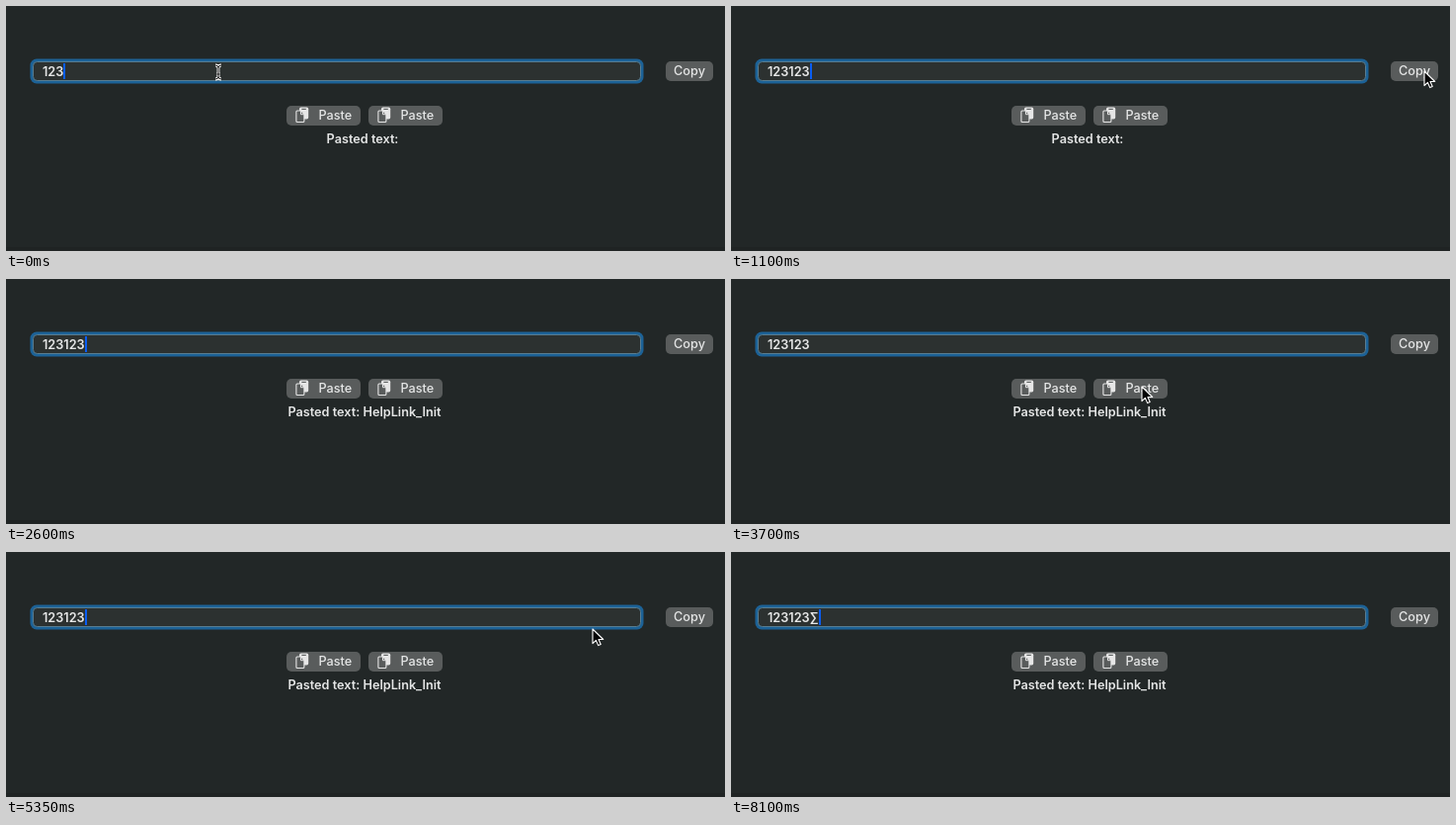
These frames come from a looping animation (728 by 248 pixels, 8650 ms). An HTML page:

```html
<!DOCTYPE html>
<html lang="en">
<head>
<meta charset="utf-8">
<title>Paste buttons</title>
<style>
  html, body { margin: 0; width: 100%; height: 100%; overflow: hidden; background: #222727; }
  svg { display: block; width: 728px; height: 248px; }
  text { font: 500 12.7px Inter, "Liberation Sans", sans-serif; fill: #e5e6e6; white-space: pre; }
  #typed, #pasted { font-weight: 600; }
  .button { fill: #595c5c; }
  .button.pressed { fill: #777a7a; }
</style>
</head>
<body>
<svg viewBox="0 0 728 248" xmlns="http://www.w3.org/2000/svg">
  <defs>
    <g id="icon">
      <rect x="4" y="1.6" width="9.2" height="11.8" rx="1.6" fill="#e6e6e6"/>
      <path d="M6.4 3.4h4.4" stroke="#595c5c" stroke-width="1.1"/>
      <path d="M1.9 5h3.7l3.3 3.4v7.1q0 1-1 1h-6q-1 0-1-1V6q0-1 1-1z" fill="#595c5c" stroke="#e6e6e6" stroke-width="1.1"/>
      <path d="M5.5 5.2v3.5h3.2" fill="none" stroke="#e6e6e6"/>
    </g>
    <g id="paste">
      <rect class="button" width="75" height="20" rx="5"/>
      <use href="#icon" x="9"/>
      <text x="32.5" y="14.3">Paste</text>
    </g>
    <path id="bar" d="M-3-7q3 0 3 2.5Q0-7 3-7M0-4.5v9M-3 7q3 0 3-2.5Q0 7 3 7M-1.8 2h3.6"/>
  </defs>

  <rect y="244" width="728" height="4" fill="#1f2323"/>

  <rect x="24.5" y="53.5" width="621" height="25" rx="6.5" fill="#1c6297"/>
  <rect x="27.5" y="56.5" width="615" height="19" rx="4" fill="#2c3130" stroke="#587d91"/>
  <text id="typed" x="37" y="71"></text>
  <rect id="caret" y="58" width="2" height="16" fill="#0a5df2"/>

  <rect id="copy" class="button" x="668" y="56" width="48" height="20" rx="5"/>
  <text x="692" y="70.3" text-anchor="middle">Copy</text>

  <g id="paste1" class="button"><use href="#paste" x="284" y="101"/></g>
  <g id="paste2" class="button"><use href="#paste" x="367" y="101"/></g>
  <text id="pasted" y="139.3" text-anchor="middle"></text>

  <g id="pointer">
    <path id="arrow" d="M0 0v14.6l3.4-3.2 2.3 5.2 2.5-1.1-2.2-5h4.7z" fill="#050505" stroke="#fff" stroke-width="1.1" stroke-linejoin="round"/>
    <g id="beam" fill="none">
      <use href="#bar" stroke="#fff" stroke-width="2.8"/>
      <use href="#bar" stroke="#111"/>
    </g>
  </g>
</svg>
<script>
const LOOP = 8650, STEP = 50;
const PASTE_AT = 2150, SYMBOL_AT = 6800;
const $ = id => document.getElementById(id);
const clamp = v => Math.min(1, Math.max(0, v));
const ease = p => p * p * (3 - 2 * p);
const within = (t, from, to) => t >= from && t < to;

const moves = [
  { from: 350, to: 1050, x: 702, y: 66, lift: 18 },
  { from: 1250, to: 1800, x: 338, y: 114, lift: 0 },
  { from: 2550, to: 2900, x: 688, y: 78, lift: 0 },
  { from: 2900, to: 3650, x: 416, y: 109, lift: 0 },
  { from: 4250, to: 4900, x: 594, y: 78, lift: 0 }
];
const clicks = { copy: 1150, paste1: 2000, paste2: 3800 };

function pointerAt(t) {
  let x = 215, y = 67;
  for (const m of moves) {
    const p = ease(clamp((t - m.from) / (m.to - m.from)));
    x += (m.x - x) * p;
    y += (m.y - y) * p - m.lift * Math.sin(Math.PI * p);
  }
  return [x, y];
}

// solid after each action, then blinking
function caretOpacity(t) {
  const lastAction = Math.max(...[0, 300, 1150, 2500, SYMBOL_AT].filter(a => a <= t));
  const idle = t - lastAction - 850;
  if (idle < 0) return 1;
  const phase = idle % 1050;
  return clamp(1 - phase / 100) + clamp((phase - 350) / 100);
}

function typedAt(t) {
  const count = Math.min(6, 3 + Math.floor(t / 100));
  return "123123".slice(0, count) + (t >= SYMBOL_AT ? "∑" : "");
}

function draw(t) {
  const typed = $("typed");
  typed.textContent = typedAt(t);
  $("caret").setAttribute("x", Math.round(37 + typed.getComputedTextLength()));
  $("caret").style.opacity = caretOpacity(t);

  const done = t >= PASTE_AT;
  $("pasted").textContent = done ? "Pasted text: HelpLink_Init" : "Pasted text:";
  $("pasted").setAttribute("x", done ? 363 : 361);

  for (const id in clicks) {
    const pressed = within(t, clicks[id], clicks[id] + 150);
    const face = $(id);
    face.classList.toggle("pressed", pressed);
    face.style.filter = pressed && id !== "copy" ? "brightness(1.3)" : "";
  }

  const [x, y] = pointerAt(t);
  const overField = within(x, 27, 643) && within(y, 56, 76);
  const hidden = within(t, 100, 350) || within(t, 2550, 2900) || t >= SYMBOL_AT;
  $("pointer").setAttribute("transform", `translate(${x} ${y})`);
  $("pointer").style.display = hidden ? "none" : "";
  $("beam").style.display = overField ? "" : "none";
  $("arrow").style.display = overField ? "none" : "";
}

const start = performance.now();
function tick() {
  const t = (performance.now() - start) % LOOP;
  draw(Math.floor(t / STEP) * STEP);
  requestAnimationFrame(tick);
}
tick();
</script>
</body>
</html>
```
